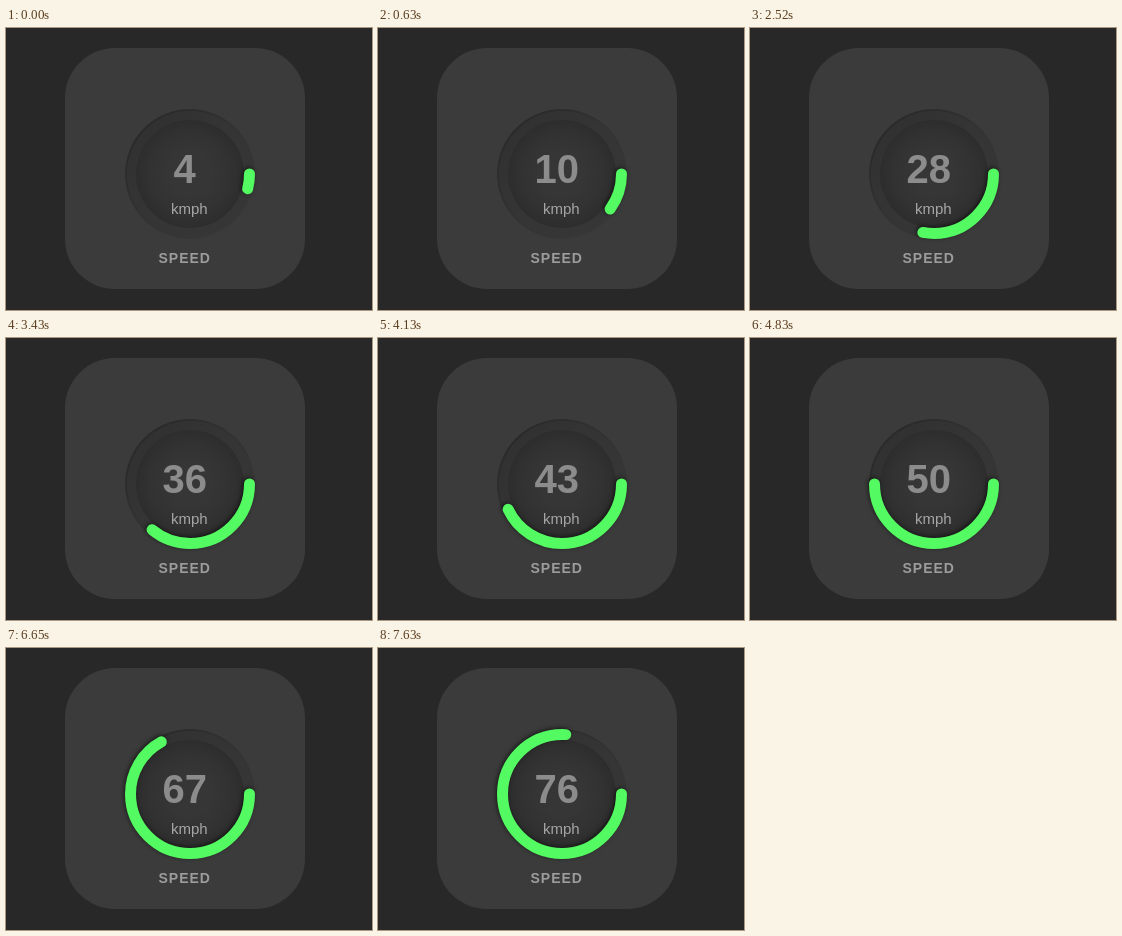
An HTML page with a canvas that plays this animation: 366x282 px, repeating every 7.7 s.

```html
<!DOCTYPE html>
<html lang="en">
<head>
<meta charset="utf-8">
<title>Speed dial</title>
<style>
  html, body { margin: 0; width: 100%; height: 100%; overflow: hidden; background: #282828; }
  canvas { display: block; }
</style>
</head>
<body>
<canvas id="stage" width="366" height="282"></canvas>
<script>
const ctx = document.getElementById('stage').getContext('2d');
const LOOP = 7700, TICK = 70;
const CX = 184, CY = 146;
const FONT = '"Liberation Sans", Arial, sans-serif';

function disc(radius, fill) {
  ctx.fillStyle = fill;
  ctx.beginPath();
  ctx.arc(CX, CY, radius, 0, Math.PI * 2);
  ctx.fill();
}

function linear(x0, y0, x1, y1, ...colors) {
  const g = ctx.createLinearGradient(x0, y0, x1, y1);
  colors.forEach((c, i) => g.addColorStop(i / (colors.length - 1), c));
  return g;
}

function label(text, x, y, font, color, align = 'left', spacing = 0) {
  ctx.font = `${font} ${FONT}`;
  ctx.fillStyle = color;
  ctx.textAlign = align;
  ctx.letterSpacing = spacing + 'px';
  ctx.fillText(text, x, y);
}

function drawCard() {
  ctx.fillStyle = '#282828';
  ctx.fillRect(0, 0, 366, 282);
  ctx.fillStyle = '#3b3b3b';
  ctx.beginPath();
  ctx.roundRect(59, 20, 240, 241, 50);
  ctx.fill();
}

function drawDial() {
  disc(65, linear(138, 100, 230, 192, '#2a2a2a', '#333333', '#383838'));
  disc(63, linear(138, 100, 230, 192, '#313131', '#353535', '#363636'));
  const bowl = ctx.createRadialGradient(CX, CY, 20, CX, CY, 54);
  bowl.addColorStop(0, '#363636');
  bowl.addColorStop(0.6, '#323232');
  bowl.addColorStop(1, '#2d2d2d');
  disc(54, bowl);
}

function drawArc(value) {
  ctx.save();
  ctx.lineCap = 'round';
  ctx.lineWidth = 11;
  ctx.strokeStyle = '#53fa61';
  ctx.shadowColor = 'rgba(0, 0, 0, 0.6)';
  ctx.shadowBlur = 4;
  ctx.shadowOffsetX = ctx.shadowOffsetY = -1;
  ctx.beginPath();
  ctx.arc(CX, CY, 59.5, 0, value / 100 * Math.PI * 2);
  ctx.stroke();
  ctx.restore();
}

function draw(time) {
  const t = Math.floor(time % LOOP / TICK) * TICK;
  const speed = 4 + Math.floor((t + 58) / 106);
  drawCard();
  drawDial();
  drawArc(speed);
  label(speed, 178.7, 155, 'bold 40px', '#8c8c8c', 'center');
  label('kmph', 165, 186, '15px', '#a6a6a6');
  label('SPEED', 152.5, 235, 'bold 14px', '#9c9c9c', 'left', 1);
}

const start = performance.now();
function loop() {
  draw(performance.now() - start);
  requestAnimationFrame(loop);
}
loop();
</script>
</body>
</html>
```
